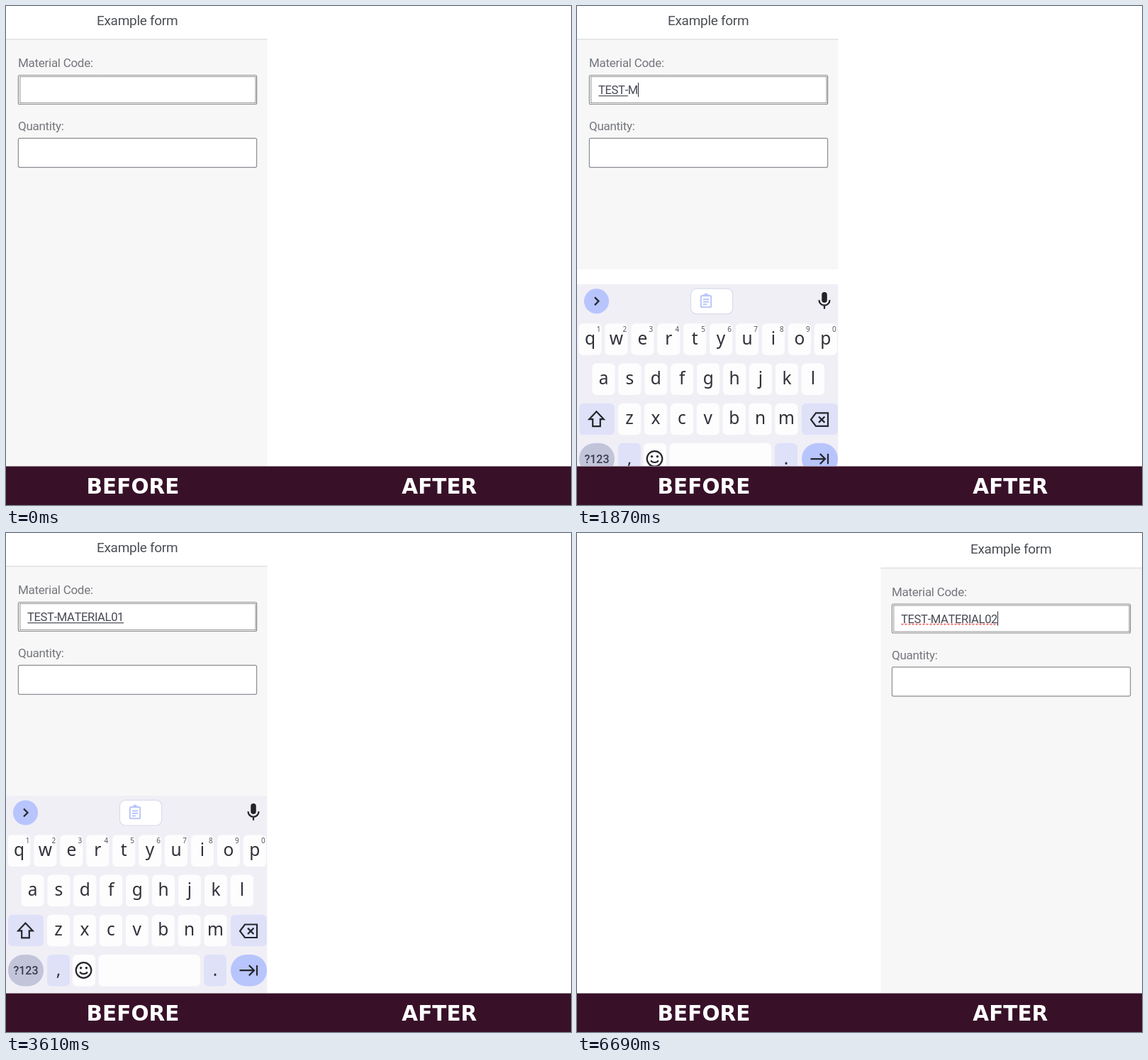
Recreate the animation shown at these times as an HTML page. Size 797 by 703 pixels, loop 7070 ms.

```html
<!DOCTYPE html>
<html lang="en">
<head>
<meta charset="utf-8">
<title>Form input: before and after</title>
<style>
  html, body { margin: 0; width: 100%; height: 100%; overflow: hidden; background: #fff; }
  svg { display: block; width: 797px; height: 703px; }
  text { font-family: Roboto, "Noto Sans", sans-serif; font-kerning: none; white-space: pre; }
  .title { font-size: 19px; letter-spacing: -.3px; fill: #4b4e55; }
  .label { font-size: 17px; letter-spacing: -.28px; fill: #75777d; }
  #value { font-size: 16.6px; letter-spacing: -.36px; fill: #484a54; }
  .box { fill: #fff; stroke: #8d8e94; stroke-width: 1.2; }
  .focus { fill: none; stroke: #222; stroke-width: 1; stroke-dasharray: 1 1; }
  .banner { font: bold 29.5px "DejaVu Sans", sans-serif; fill: #fff; }
  .key { fill: #fdfdfe; }
  .side { fill: #dfe1f9; }
  .letter { font: 24.5px "Noto Sans", sans-serif; text-anchor: middle; fill: #303138; }
  .digit { font: 10px "Noto Sans", sans-serif; text-anchor: middle; fill: #55565e; }
  .mode { font-size: 16px; font-weight: 500; text-anchor: middle; fill: #3b3d4c; }
  .icon { fill: none; stroke: #25262d; stroke-width: 2.2; }
  .clip { fill: none; stroke: #bac5fc; stroke-width: 2; }
</style>
</head>
<body>
<svg viewBox="0 0 797 703">
  <defs>
    <clipPath id="phone"><rect width="368.5" height="648"/></clipPath>
    <linearGradient id="edge" x2="0" y2="1">
      <stop offset="0" stop-color="#fff"/>
      <stop offset=".4" stop-color="#dedfe0"/>
      <stop offset="1" stop-color="#f7f7f7"/>
    </linearGradient>
  </defs>

  <g id="form">
    <g id="shell">
      <rect id="panel" y="47" width="368.5" height="324" fill="#f7f7f7"/>
      <rect y="45.5" width="368.5" height="3" fill="url(#edge)"/>
    </g>
    <text class="title" x="128" y="26.7">Example form</text>
    <text class="label" x="17" y="86.4">Material Code:</text>
    <rect class="box" x="17.4" y="97.5" width="336.2" height="41" rx="2"/>
    <rect class="focus" x="19.8" y="99.5" width="332.2" height="37"/>
    <text class="label" x="17" y="175.4">Quantity:</text>
    <rect class="box" x="17.4" y="186.3" width="336.2" height="41" rx="2"/>
    <text id="value" x="30" y="124"></text>
    <rect id="under" x="30.5" y="126" height="1.2" fill="#4c4e58"/>
    <path id="spell" d="M30.5 126.2H166" fill="none" stroke="#ee6262" stroke-width="1.7" stroke-dasharray="3 2"/>
    <rect id="caret" y="108" width="1" height="20" fill="#2c2d33"/>
  </g>

  <g clip-path="url(#phone)">
    <g id="board">
      <rect y="370" width="368.5" height="300" fill="#f1eff6"/>
      <circle cx="27.5" cy="394" r="17.6" fill="#b8c5fd"/>
      <path class="icon" d="M25 388.5l5.5 5.5-5.5 5.5"/>
      <rect x="160.5" y="376.3" width="59.2" height="35.7" rx="8" fill="#fff" stroke="#d9dbea" stroke-width="1.2"/>
      <g class="clip">
        <rect x="174.8" y="386.3" width="14.4" height="16" rx="1"/>
        <path d="M178 385.5h8M178 391.5h8M178 395h8M178 398.5h5"/>
        <circle cx="182" cy="384.8" r="1.2"/>
      </g>
      <g transform="translate(334 378.6) scale(1.25)">
        <rect x="9" y="2" width="6" height="12" rx="3" fill="#222329"/>
        <path class="icon" style="stroke-width:1.8" d="M6 11a6 6 0 0 0 12 0M12 17v4"/>
      </g>
      <g id="keys"></g>
      <g class="icon">
        <path d="M27.5 549.5l-10.2 10.8h4.9v10h10.6v-10h4.9z"/>
        <path d="M337 551.5h17v18.5h-17l-7-9.2zM341 556.6l8.4 8.4M349.4 556.6l-8.4 8.4"/>
        <circle cx="109.5" cy="616" r="10.8"/>
        <path d="M104.2 618.4a5.8 4.6 0 0 0 10.6 0"/>
        <path d="M329.5 616.2H350M342.8 609l7.2 7.2-7.2 7.2M354 609v14.4"/>
      </g>
      <g fill="#25262d">
        <circle cx="105.6" cy="612.8" r="1.7"/>
        <circle cx="113.4" cy="612.8" r="1.7"/>
      </g>
    </g>
  </g>

  <rect y="648.5" width="797" height="54.5" fill="#381129"/>
  <text class="banner" x="113.6" y="686.6">BEFORE</text>
  <text class="banner" x="558.3" y="686.6">AFTER</text>
</svg>
<script>
const LOOP = 7070, OPEN = 1720, SWAP = 3890, SPELL = 6690;
const WORD = "TEST-MATERIAL0";

// time, characters typed, caret shown, characters underlined
const steps = [
  [0, 0, 0, 0], [410, 0, 1, 0], [920, 0, 0, 0], [1440, 0, 1, 0],
  [1720, 2, 1, 0], [1770, 3, 1, 2], [1820, 5, 1, 4], [1870, 6, 1, 5],
  [1900, 7, 1, 6], [1950, 9, 1, 8], [2000, 11, 1, 10], [2050, 13, 1, 12],
  [2100, 15, 1, 13], [2330, 15, 1, 15], [2610, 15, 0, 15], [3100, 15, 1, 15],
  [3610, 15, 0, 15],
  [3890, 0, 1, 0], [4200, 0, 0, 0], [4660, 0, 1, 0], [5220, 0, 0, 0],
  [5550, 4, 1, 0], [5600, 10, 1, 0], [5650, 15, 1, 0], [6130, 15, 0, 0],
  [6660, 15, 1, 0], [6690, 15, 1, 0]
];

const $ = id => document.getElementById(id);
const show = (el, on) => el.setAttribute("visibility", on ? "visible" : "hidden");

function add(tag, attrs, text = "") {
  const el = document.createElementNS($("keys").namespaceURI, tag);
  for (const name in attrs) el.setAttribute(name, attrs[name]);
  el.textContent = text;
  $("keys").append(el);
}

const key = (x, row, width, cls = "key", more = {}) =>
  add("rect", { x, y: 425.4 + row * 56.2, width, height: 44.5, rx: 6, class: cls, ...more });

["qwertyuiop", "asdfghjkl", "zxcvbnm"].forEach((letters, row) => {
  const left = [18.5, 37.5, 74][row];
  [...letters].forEach((ch, i) => {
    const x = left + 36.92 * i;
    key(x - 16, row, 32);
    add("text", { x, y: 455 + row * 56, class: "letter" }, ch);
    if (!row) add("text", { x: x + 12, y: 437, class: "digit" }, (i + 1) % 10);
  });
});

key(3, 2, 50, "side");
key(317, 2, 51, "side");
key(3, 3, 50, "", { rx: 22, fill: "#c2c4da" });
key(58, 3, 32, "side");
key(94, 3, 32);
key(130.5, 3, 143.5);
key(279, 3, 32, "side");
key(317, 3, 51, "", { rx: 22, fill: "#b8c5fd" });
add("text", { x: 28, y: 622, class: "mode" }, "?123");
add("text", { x: 74, y: 624, class: "letter" }, ",");
add("text", { x: 295, y: 624, class: "letter" }, ".");

function draw([time, typed, caret, lined]) {
  const after = time >= SWAP;
  const open = !after && time >= OPEN;
  const value = $("value");
  value.textContent = (WORD + (after ? 2 : 1)).slice(0, typed);
  const width = n => n ? value.getSubStringLength(0, n) : 0;

  $("form").setAttribute("transform", after ? "translate(427 2.5)" : "");
  $("shell").setAttribute("transform", after ? "translate(1.5 0)" : "");
  $("panel").setAttribute("height", open ? 324 : 610);
  $("caret").setAttribute("x", 30 + width(typed));
  $("under").setAttribute("width", Math.max(0, width(lined) - .5));
  show($("caret"), caret);
  show($("spell"), time >= SPELL);
  show($("board"), open);

  const left = 1 - Math.min(1, Math.max(0, (time - OPEN) / 280));
  $("board").setAttribute("transform", `translate(0 ${218.5 * left ** 3})`);
}

const start = performance.now();
let last;
function tick() {
  const t = (performance.now() - start) % LOOP;
  const step = steps.findLast(s => s[0] <= t);
  if (step !== last) draw(last = step);
  requestAnimationFrame(tick);
}
tick();
</script>
</body>
</html>
```
